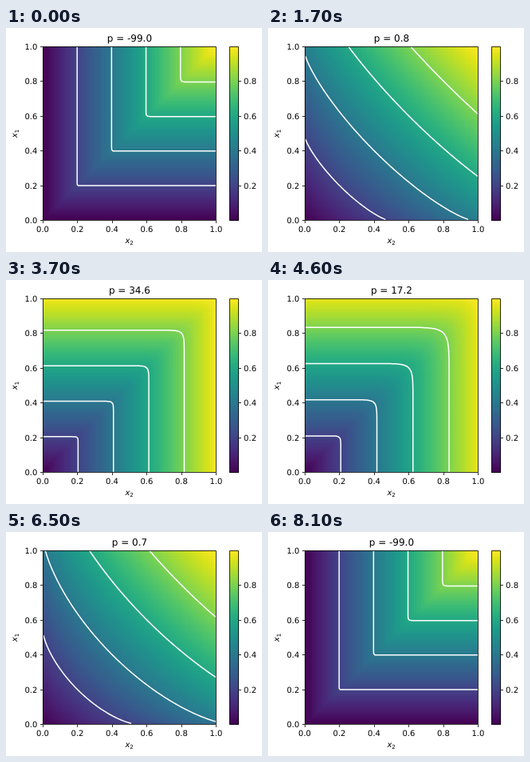
Recreate the animation shown at these times as an HTML page with a canvas. Size 321x280 px, loop 8.2 s.

```html
<!DOCTYPE html>
<html lang="en">
<head>
<meta charset="utf-8">
<title>Power mean</title>
<style>
  html, body { margin: 0; width: 100%; height: 100%; overflow: hidden; background: #fff; }
  canvas, svg { position: absolute; left: 0; top: 0; width: 321px; height: 280px; }
  text { font: 10px "DejaVu Sans", sans-serif; text-rendering: geometricPrecision; }
  .title { font-size: 12px; }
  .var { font-style: italic; }
  .sub { font-size: 7px; font-style: normal; }
  .mid { text-anchor: middle; }
  .end { text-anchor: end; }
  path { fill: none; stroke: #000; stroke-width: .8; }
</style>
</head>
<body>
<canvas id="plot" width="321" height="280"></canvas>
<svg id="axes" viewBox="0 0 321 280">
  <text id="title" class="title mid" x="154.9" y="17"></text>
  <text class="var" x="149.4" y="269">x<tspan class="sub" dy="1.6">2</tspan></text>
  <text class="var" transform="translate(14 137.2) rotate(-90)">x<tspan class="sub" dy="1.6">1</tspan></text>
</svg>
<script>
const LEFT = 46, TOP = 22.8, SIZE = 217.44, BOTTOM = TOP + SIZE;
const BAR = { left: 280, right: 291 };
const N = 100, LOW = 0.5 / N, HIGH = 1 - LOW;
const LEVELS = [0.2, 0.4, 0.6, 0.8];
const STEP_MS = 100, HALF = 20, STEPS = 2 * HALF + 1;

const VIRIDIS = ('440154 481567 482677 453781 404788 39568c 33638d 2d708e 287d8e 238a8d ' +
  '1f968b 20a387 29af7f 3cbb75 55c667 73d055 95d840 b8de29 dce319 fde725')
  .split(' ').map(hex => [0, 2, 4].map(i => parseInt(hex.slice(i, i + 2), 16)));

function viridis(t) {
  const pos = Math.min(Math.max(t, 0), 1) * (VIRIDIS.length - 1);
  const i = Math.min(Math.floor(pos), VIRIDIS.length - 2);
  return VIRIDIS[i].map((c, k) => Math.round(c + (VIRIDIS[i + 1][k] - c) * (pos - i)));
}
const palette = Array.from({ length: 256 }, (_, i) => viridis(i / 255));
const colorOf = t => palette[Math.min(255, Math.max(0, Math.floor(t * 256)))];

const ctx = document.getElementById('plot').getContext('2d');
const svg = document.getElementById('axes');
const title = document.getElementById('title');
const heat = document.createElement('canvas');
heat.width = heat.height = N;
const heatCtx = heat.getContext('2d');
const pixels = heatCtx.createImageData(N, N);
const field = new Float64Array(N * N);

const snap = v => Math.floor(v + 0.5) + 0.5;

function add(tag, attrs, text = '') {
  const node = document.createElementNS('http://www.w3.org/2000/svg', tag);
  for (const name in attrs) node.setAttribute(name, attrs[name]);
  node.textContent = text;
  svg.append(node);
}
const line = d => add('path', { d });
const label = (x, y, cls, v) => add('text', { x, y, class: cls }, v.toFixed(1));
const box = (x0, x1) =>
  line(`M${snap(x0)} ${snap(TOP)}H${snap(x1)}V${snap(BOTTOM)}H${snap(x0)}Z`);

function drawAxes() {
  box(LEFT, LEFT + SIZE);
  box(BAR.left, BAR.right);
  for (let i = 0; i <= 5; i++) {
    const x = LEFT + SIZE * i / 5, y = BOTTOM - SIZE * i / 5;
    line(`M${snap(x)} ${snap(BOTTOM)}v3.5`);
    line(`M${snap(LEFT)} ${snap(y)}h-3.5`);
    label(x, 255, 'mid', i / 5);
    label(39.3, Math.round(y + 4), 'end', i / 5);
  }
  for (const v of LEVELS) {
    const y = BOTTOM - SIZE * (v - LOW) / (HIGH - LOW);
    line(`M${snap(BAR.right)} ${snap(y)}h3.5`);
    label(298.1, Math.round(y + 4), '', v);
  }
}

function drawColorbar() {
  for (let y = 23; y <= 240; y++) {
    ctx.fillStyle = `rgb(${colorOf((BOTTOM - y - 0.5) / SIZE)})`;
    ctx.fillRect(BAR.left, y, BAR.right - BAR.left + 1, 1);
  }
}

// Exponents lie at logarithmic distances 0.1 to 100 on both sides of 1.
function exponent(k) {
  const u = k - HALF;
  return 1 + Math.sign(u) * 10 ** (-1 + 3 * (Math.abs(u) - 1) / (HALF - 1));
}

function fillField(p) {
  const powers = Array.from({ length: N }, (_, i) => ((i + 0.5) / N) ** p);
  for (let j = 0; j < N; j++) {
    for (let i = 0; i < N; i++) {
      const z = ((powers[i] + powers[j]) / 2) ** (1 / p);
      field[j * N + i] = z;
      pixels.data.set([...colorOf((z - LOW) / (HIGH - LOW)), 255], ((N - 1 - j) * N + i) * 4);
    }
  }
  heatCtx.putImageData(pixels, 0, 0);
}

function traceLevel(level) {
  const corners = [[0, 0], [1, 0], [1, 1], [0, 1]];
  for (let j = 0; j < N - 1; j++) {
    for (let i = 0; i < N - 1; i++) {
      let started = false;
      corners.forEach(([ax, ay], c) => {
        const [bx, by] = corners[(c + 1) % 4];
        const a = field[(j + ay) * N + i + ax], b = field[(j + by) * N + i + bx];
        if ((a < level) === (b < level)) return;
        const f = (level - a) / (b - a);
        const x = LEFT + SIZE * (i + 0.5 + ax + (bx - ax) * f) / N;
        const y = BOTTOM - SIZE * (j + 0.5 + ay + (by - ay) * f) / N;
        if (started) ctx.lineTo(x, y);
        else ctx.moveTo(x, y);
        started = true;
      });
    }
  }
}

function drawPlot(p) {
  fillField(p);
  ctx.save();
  ctx.beginPath();
  ctx.rect(LEFT, 23, 218, 218);
  ctx.clip();
  ctx.imageSmoothingEnabled = false;
  ctx.drawImage(heat, LEFT, TOP, SIZE, SIZE);
  ctx.beginPath();
  LEVELS.forEach(traceLevel);
  ctx.strokeStyle = '#fff';
  ctx.lineWidth = 1.5;
  ctx.lineCap = ctx.lineJoin = 'round';
  ctx.stroke();
  ctx.restore();
  title.textContent = `p = ${p.toFixed(1)}`;
}

let shown = -1;
function tick(now) {
  const n = Math.floor(now / STEP_MS) % (2 * STEPS);
  const k = n < STEPS ? n : 2 * STEPS - 1 - n;
  if (k !== shown) drawPlot(exponent(shown = k));
  requestAnimationFrame(tick);
}

drawAxes();
drawColorbar();
tick(0);
</script>
</body>
</html>
```
